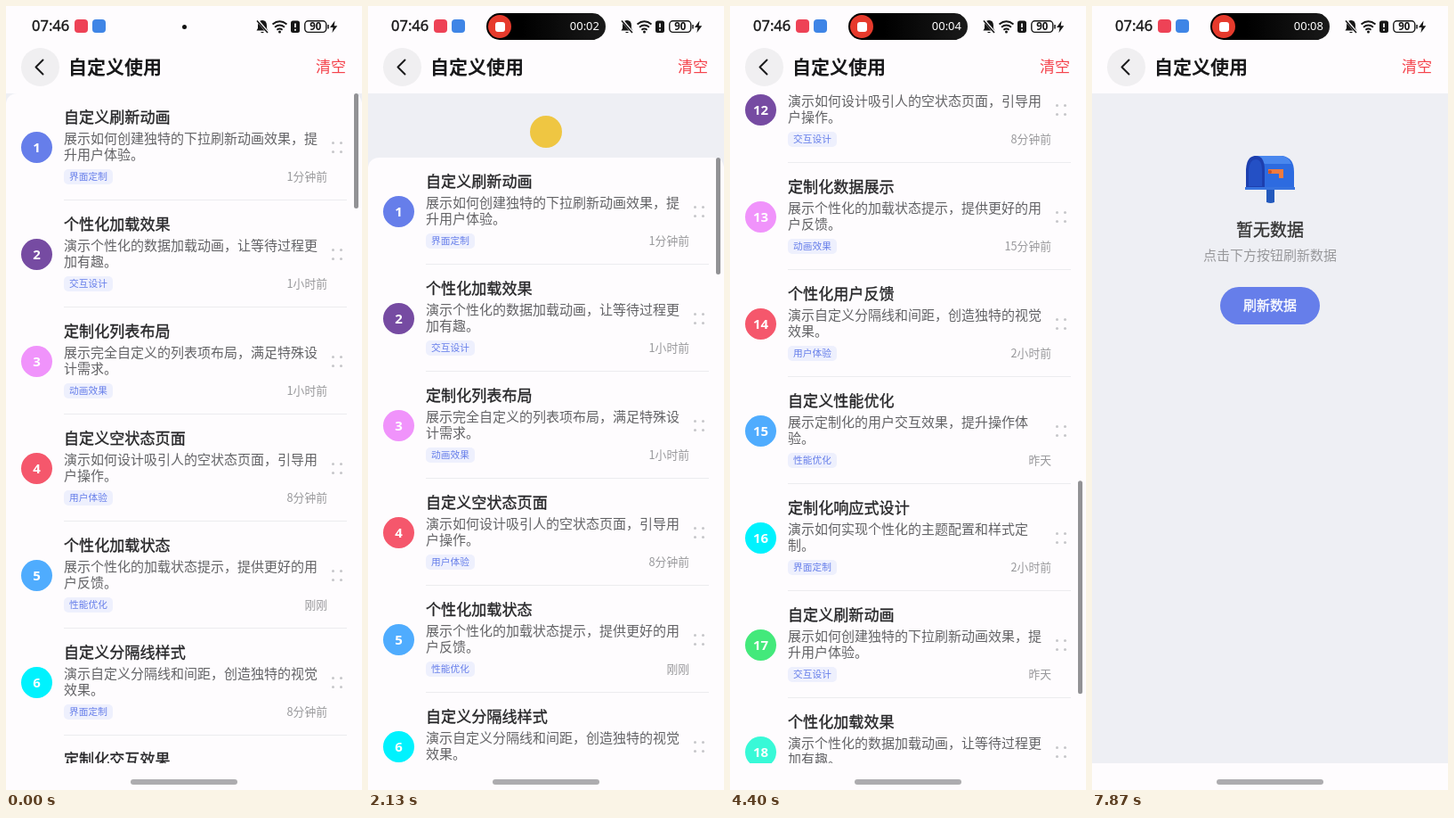
Write an HTML page that moves like this. It is 400 px wide and 879 px high and loops after 8 s.

```html
<!DOCTYPE html>
<html lang="zh-CN">
<head>
<meta charset="utf-8">
<title>自定义使用</title>
<style>
  html, body { margin: 0; width: 100%; height: 100%; overflow: hidden; background: #fefcfe; }
  #stage { position: relative; width: 400px; height: 879px; overflow: hidden; background: #fefcfe;
    font-family: "Noto Sans CJK SC", "Noto Sans CJK", "Noto Sans", sans-serif; text-spacing-trim: space-all; }
  #stage * { box-sizing: border-box; }
  #stage div, #stage svg { position: absolute; }
  .text { white-space: nowrap; line-height: 24px; }
  .latin { font-family: "Noto Sans", sans-serif; }
  /* stands in for a medium weight */
  .medium { -webkit-text-stroke: .35px currentColor; }

  #view { left: 0; top: 98px; width: 400px; height: 751px; overflow: hidden; background: #eeeff4; }
  #list { left: 0; top: 0; width: 400px; height: 2400px; border-radius: 12px 12px 0 0; background: #fefcfe; }
  .item { left: 0; width: 400px; height: 120px; }
  .item::after { content: ""; position: absolute; left: 65px; top: 119px; width: 318px; height: 1px; background: #ececef; }
  .badge { left: 17px; top: 43px; width: 35px; height: 35px; border-radius: 50%; color: #fff;
    font: 700 15px/34px "Noto Sans", sans-serif; text-align: center; }
  .name { left: 65px; top: 14px; font-size: 17.1px; color: #262628; }
  .desc { left: 65px; top: 41px; width: 288px; font-size: 15px; line-height: 17.6px; color: #636366; }
  .tag { left: 65px; top: 85px; width: 55px; height: 17px; border-radius: 5px; background: #eef0fd; color: #667eea;
    font-size: 10.7px; line-height: 15.5px; text-align: center; white-space: nowrap; }
  .ago { right: 39px; top: 81px; font-size: 12.8px; color: #98989b; }
  .grip { left: 365.5px; top: 53.5px; width: 3px; height: 3px; border-radius: 50%; background: #c6c6ca;
    box-shadow: 9px 0 #c6c6ca, 0 10px #c6c6ca, 9px 10px #c6c6ca; }
  #spinner { left: 182px; top: 25px; width: 36px; height: 36px; border-radius: 50%; background: #efc642; }
  #bar { left: 391px; width: 5px; border-radius: 3px; background: #929295; }

  #empty { inset: 0; text-align: center; }
  #empty .text { width: 400px; left: 0; }
  #button { left: 144px; top: 217px; width: 112px; height: 42px; border-radius: 21px; background: #667eea;
    color: #fff; font-size: 15px; line-height: 40px; }

  #back { left: 17px; top: 47px; width: 43px; height: 43px; border-radius: 50%; background: #f0eff1; }
  .icon { width: 15px; height: 15px; top: 15px; border-radius: 4px; }
  #pill { left: 133px; top: 8px; width: 134px; height: 30px; border-radius: 15px; overflow: hidden;
    background: linear-gradient(90deg, #000 30%, #1a1a1a); }
  #camera { left: 197.5px; top: 20.5px; width: 5px; height: 5px; border-radius: 50%; background: #111; }
  #touch { left: -12px; top: -12px; width: 24px; height: 24px; border-radius: 50%;
    border: 2px solid rgba(185,185,190,.7); background: rgba(250,250,252,.6); }
  #home { left: 140px; top: 867px; width: 120px; height: 6px; border-radius: 3px; background: #adacaf; }
</style>
</head>
<body>
<div id="stage">
  <div id="view">
    <div id="spinner"></div>
    <div id="list"></div>
    <div id="bar"></div>
    <div id="empty">
      <svg style="left:170px;top:68px" width="60" height="56" viewBox="0 0 60 56">
        <path d="M26 36h9v18q-4 2-9 0z" fill="#2359bd"/>
        <path d="M12 2h32q13 2 13 18v18H20z" fill="#2d6be0"/>
        <path d="M14 2h29q8 1 11 9H24z" fill="#4987ee"/>
        <path d="M3 38V17Q4 2 14 2q10 0 10 16v20z" fill="#1d3fae"/>
        <path d="M6 36V18Q7 6 14 6q7 0 7 13v17z" fill="#2450c5"/>
        <path d="M2 37h56v3H2z" fill="#3773df"/>
        <path d="M28 17h17v10h-5v-5H28z" fill="#ef7a3f"/>
        <circle cx="30" cy="20" r="2" fill="#c95128"/>
      </svg>
      <div class="text medium" style="top:140px;font-size:19px;color:#333">暂无数据</div>
      <div class="text" style="top:169px;font-size:15px;color:#98989b">点击下方按钮刷新数据</div>
      <div id="button" class="medium">刷新数据</div>
    </div>
  </div>

  <div id="back"></div>
  <svg style="left:28px;top:58px" width="20" height="22" fill="none" stroke="#1b1b1d" stroke-width="2" stroke-linecap="round" stroke-linejoin="round"><path d="M13.5 2.5 5.5 10.5l8 8"/></svg>
  <div class="text" style="left:70px;top:55px;font-size:21px;font-weight:700;color:#18181a">自定义使用</div>
  <div class="text" style="left:348px;top:55px;font-size:17.1px;color:#f4434c">清空</div>

  <div id="left">
    <div class="text latin medium" style="left:29px;top:10px;font-size:16.5px;color:#161616">07:46</div>
    <div class="icon" style="left:77px;background:#ee4256"></div>
    <div class="icon" style="left:96.5px;background:#3f85e6"></div>
  </div>
  <svg id="right" style="left:280px;top:12px" width="100" height="22" fill="#161616">
    <path d="M8 4q5 0 5 6v3l1.5 2.5h-13L3 13v-3q0-6 5-6zM6 17h4q-2 2.5-4 0z"/>
    <path d="M2 3.5 14.5 18" stroke="#fefcfe" stroke-width="3"/>
    <path d="M2 4.5 14 18" stroke="#161616" stroke-width="1.5"/>
    <g fill="none" stroke="#161616" stroke-width="1.8"><path d="M19.5 8.5q8-6.5 16 0M22 11.7q5.5-4.5 11 0M24.4 14.7q3.1-2.4 6.2 0"/></g>
    <circle cx="27.5" cy="17" r="1.5"/>
    <rect x="40" y="4.5" width="10" height="13.5" rx="2.5"/>
    <path d="M45 7.5v4.5M45 13.7v2" stroke="#fff" stroke-width="1.7"/>
    <rect x="55.8" y="4.8" width="24" height="12.6" rx="3.8" fill="none" stroke="#161616" stroke-width="1.4"/>
    <path d="M81.3 9h1.5v4.5h-1.5zM89.5 4.5 84 12h3.5l-1 6 5.8-7.7h-3.6z"/>
    <text x="67.8" y="15.4" font-family="Noto Sans, sans-serif" font-size="11.5" font-weight="600" text-anchor="middle">90</text>
  </svg>
  <div id="pill">
    <div style="left:2px;top:2px;width:26px;height:26px;border-radius:50%;background:#e63a2c"></div>
    <div style="left:9.5px;top:9.5px;width:11px;height:11px;border-radius:3px;background:#fff"></div>
    <div id="clock" class="text latin" style="right:7px;top:2px;font-size:13px;color:#fff"></div>
  </div>
  <div id="camera"></div>
  <div id="touch"></div>
  <div id="home"></div>
</div>

<script>
const LOOP = 8000, ITEM = 120, VIEW = 750;
const REFRESHED = 2950, CLEARED = 6930;
const $ = id => document.getElementById(id);

const colors = '#667eea #764ba2 #f093fb #f5576c #4facfe #00f2fe #43e97b #38f9d7 #ebe6d6 #fcb69f'.split(' ');
const tags = '界面定制 交互设计 动画效果 用户体验 性能优化'.split(' ');
const names = ('自定义刷新动画 个性化加载效果 定制化列表布局 自定义空状态页面 个性化加载状态 自定义分隔线样式 ' +
  '定制化交互效果 个性化主题配置 自定义手势操作 定制化动画过渡 个性化状态指示器 自定义错误处理 ' +
  '定制化数据展示 个性化用户反馈 自定义性能优化 定制化响应式设计').split(' ');
const descs = [
  '展示如何创建独特的下拉刷新动画效果，提升用户体验。',
  '演示个性化的数据加载动画，让等待过程更加有趣。',
  '展示完全自定义的列表项布局，满足特殊设计需求。',
  '演示如何设计吸引人的空状态页面，引导用户操作。',
  '展示个性化的加载状态提示，提供更好的用户反馈。',
  '演示自定义分隔线和间距，创造独特的视觉效果。',
  '展示定制化的用户交互效果，提升操作体验。',
  '演示如何实现个性化的主题配置和样式定制。'
];
const oldTimes = '1分钟前 1小时前 1小时前 8分钟前 刚刚 8分钟前 2小时前'.split(' ');
const newTimes = ('1分钟前 刚刚 2小时前 30分钟前 8分钟前 2小时前 3分钟前 15分钟前 昨天 1分钟前 ' +
  '1小时前 8分钟前 15分钟前 2小时前 昨天 2小时前 昨天 3分钟前 1小时前 刚刚').split(' ');

const pick = (table, i) => table[i % table.length];
$('list').innerHTML = newTimes.map((_, i) => `
  <div class="item" style="top:${i * ITEM}px">
    <div class="badge" style="background:${pick(colors, i)}">${i + 1}</div>
    <div class="text name medium">${pick(names, i)}</div>
    <div class="desc">${pick(descs, i)}</div>
    <div class="tag">${pick(tags, i)}</div>
    <div class="text ago"></div>
    <div class="grip"></div>
  </div>`).join('');
const agos = [...document.querySelectorAll('.ago')];

// Steps are [time, value]; each segment is eased by the given curve.
const linear = p => p;
const smooth = p => p * p * (3 - 2 * p);
function track(steps, t, ease = linear) {
  if (t <= steps[0][0]) return steps[0][1];
  for (let i = 1; i < steps.length; i++) {
    const [t0, a] = steps[i - 1], [t1, b] = steps[i];
    if (t < t1) return a + (b - a) * ease((t - t0) / (t1 - t0));
  }
  return steps[steps.length - 1][1];
}

const pull = [[1330, 0], [1750, 92], [1820, 92], [2050, 72], [REFRESHED, 72], [3263, 0]];
const thumb = [[0, 129], [2150, 131], [REFRESHED - 1, 131], [REFRESHED, 202], [3400, 202], [3930, 248], [5400, 220]];
const pill = [[150, 0], [450, 1]];
const touches = [
  { from: 1130, to: 1820, x: 193, y: [[1300, 357], [1750, 560]] },
  { from: 3330, to: 3500, x: 215, y: [[3350, 640], [3500, 460]] },
  { from: 6800, to: 6930, x: 365, y: [[6800, 68]] }
];

// A short drag followed by a fling that decays exponentially.
function scrollAt(t) {
  if (t < 3500) return track([[3350, 0], [3500, 180]], t);
  return 1470 - 1290 * Math.exp(-(Math.min(t, 5870) - 3500) / 363);
}

let shownTimes;
function setTimes(times) {
  if (times === shownTimes) return;
  shownTimes = times;
  agos.forEach((el, i) => el.textContent = pick(times, i));
}

function draw(t) {
  const offset = track(pull, t, smooth), scroll = scrollAt(t), cleared = t >= CLEARED;
  setTimes(t < REFRESHED ? oldTimes : newTimes);
  // Whole pixels keep text and separators crisp.
  $('list').style.transform = `translateY(${Math.round(offset - scroll)}px)`;
  $('spinner').style.transform = `translateY(${Math.round(offset - 72)}px)`;

  const height = track(thumb, t);
  $('bar').style.height = height + 'px';
  $('bar').style.transform = `translateY(${offset + scroll * height / VIEW}px)`;
  for (const id of ['list', 'bar', 'spinner']) $(id).style.display = cleared ? 'none' : '';
  $('empty').style.display = cleared ? '' : 'none';

  const open = track(pill, t, smooth);
  $('pill').style.transform = `scale(${open})`;
  $('camera').style.display = open ? 'none' : '';
  $('left').style.transform = `translateX(${-3 * open}px)`;
  $('right').style.transform = `translateX(${3 * open}px)`;
  $('clock').textContent = '00:0' + Math.floor((t + 130) / 1000);

  const touch = touches.find(p => t >= p.from && t < p.to);
  $('touch').style.display = touch ? '' : 'none';
  if (touch) $('touch').style.transform = `translate(${touch.x}px, ${track(touch.y, t)}px)`;
}

const start = performance.now();
function frame() {
  draw((performance.now() - start) % LOOP);
  requestAnimationFrame(frame);
}
frame();
</script>
</body>
</html>
```
